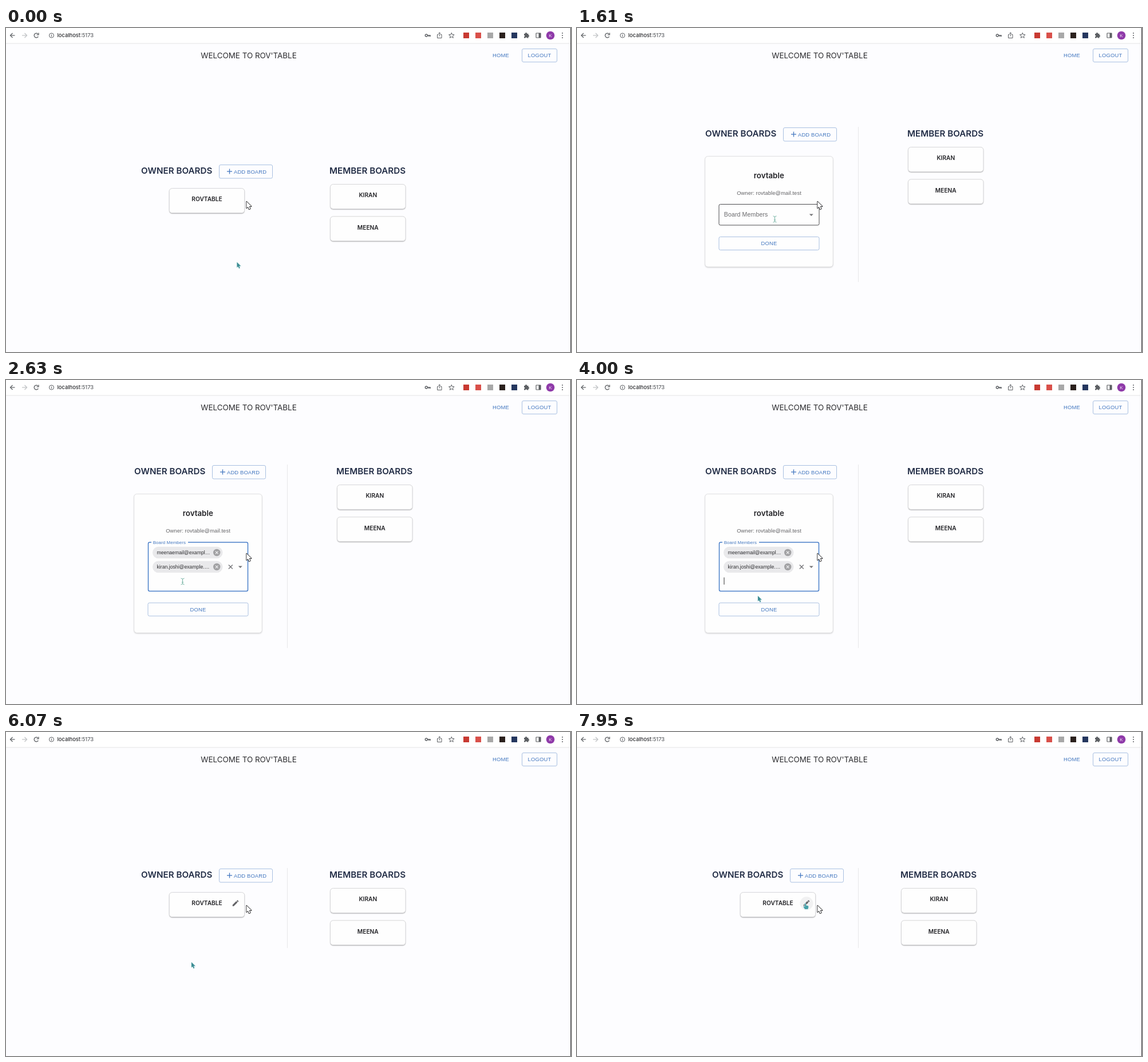
An HTML page with a canvas that plays this animation: 987 by 567 pixels, repeating every 8 s.

```html
<!DOCTYPE html>
<html lang="en">
<head>
<meta charset="utf-8">
<title>Boards</title>
<style>
  html, body { margin: 0; width: 100%; height: 100%; overflow: hidden; background: #fdfdff; }
  canvas { display: block; }
</style>
</head>
<body>
<canvas id="stage" width="987" height="567"></canvas>
<script>
const ctx = document.getElementById('stage').getContext('2d');
const LOOP = 8000;
const SANS = '"Liberation Sans", Arial, sans-serif';
const INTER = 'Inter, sans-serif';
const BLUE = '#4478c0', NAVY = '#232e47', INK = '#222226', ICON = '#5c5f63';
const STRONG = { family: INTER, weight: 600 };
const PENCIL = new Path2D('M3 17.25V21h3.75L17.81 9.94l-3.75-3.75zM20.71 7.04a1 1 0 0 0 0-1.41l-2.34-2.34a1 1 0 0 0-1.41 0l-1.83 1.83 3.75 3.75z');
const ARROW = new Path2D('M0 0V12.6L2.9 10L5 15L7.2 14L5.1 9.2H9.3Z');
const HAND = new Path2D('M-2.5 -4.5Q-1.3 -5.8 -.5 -4.3L.2 -1.2L4 -.2Q5.2 .5 4.6 3L3.6 6H-2L-4.6 2.2Q-5.2 .6 -3.4 .8L-1.8 1.8Z');

// Pointer samples, each held until the next: time, x, y, shape
const POINTER = [
  [0, 403.5, 410, 'arrow'], [120, 398, 382, 'arrow'], [270, 394, 355, 'arrow'],
  [550, 398, 336, 'arrow'], [680, 402, 316, 'hand'], [810, 401, 305, 'hand'],
  [1330, 399, 300, 'arrow'], [1610, 345.5, 334.5, 'beam'], [1890, 340, 338, 'beam'],
  [2020, 332, 343, 'beam'], [2150, 323, 347, 'beam'], [2280, 315, 350, 'beam'],
  [2410, 310, 352, 'beam'], [2630, 308.5, 352.5, 'beam'], [2900, 306.5, 352.5, 'beam'],
  [3860, 309, 360, 'beam'], [3990, 316, 378, 'arrow'], [4120, 323, 399, 'hand'],
  [4250, 326, 406, 'hand'], [5940, 324, 403, 'arrow'], [6350, 350, 393, 'arrow'],
  [6480, 440, 374, 'arrow'], [6610, 555, 354, 'arrow'], [6740, 585, 343, 'arrow'],
  [6870, 540, 329, 'arrow'], [7000, 465, 314, 'arrow'], [7130, 408, 306, 'hand'],
  [7300, 401, 303, 'hand'], [7450, 398, 304, 'hand'], [7700, 399, 305, 'hand'],
  [7950, 400, 304.5, 'hand']
];

// Draws text centred vertically on cy and returns its width
function text(str, x, cy, size, color, { align = 'left', family = SANS, weight = 400, gap = 0 } = {}) {
  ctx.font = `${weight} ${size}px ${family}`;
  ctx.letterSpacing = gap + 'px';
  ctx.textAlign = align;
  ctx.fillStyle = color;
  ctx.fillText(str, x, cy + size * 0.36);
  return ctx.measureText(str).width;
}

function rounded(x, y, w, h, r, stroke, fill, width = 1) {
  ctx.beginPath();
  ctx.roundRect(x, y, w, h, r);
  if (fill) { ctx.fillStyle = fill; ctx.fill(); }
  if (stroke) { ctx.strokeStyle = stroke; ctx.lineWidth = width; ctx.stroke(); }
}

function disc(x, y, r, fill, stroke, width = 1) {
  rounded(x - r, y - r, 2 * r, 2 * r, r, stroke, fill, width);
}

function line(color, width, ...points) {
  ctx.beginPath();
  points.forEach(([x, y]) => ctx.lineTo(x, y));
  ctx.strokeStyle = color;
  ctx.lineWidth = width;
  ctx.stroke();
}

function cross(x, y, r, color, width) {
  line(color, width, [x - r, y - r], [x + r, y + r]);
  line(color, width, [x + r, y - r], [x - r, y + r]);
}

function shape(path, x, y, scale, fill, stroke, width = 1) {
  ctx.save();
  ctx.translate(x, y);
  ctx.scale(scale, scale);
  ctx.lineJoin = 'round';
  ctx.lineWidth = width;
  if (stroke) { ctx.strokeStyle = stroke; ctx.stroke(path); }
  ctx.fillStyle = fill;
  ctx.fill(path);
  ctx.restore();
}

function card(x, y, w, h, border, shadow, blur) {
  ctx.save();
  ctx.shadowColor = `rgba(0,0,0,${shadow})`;
  ctx.shadowBlur = blur;
  ctx.shadowOffsetY = 1.2;
  rounded(x, y, w, h, 5, null, '#fefefe');
  ctx.restore();
  rounded(x, y, w, h, 5, border);
}

function button(label, x, y, w, h, hover) {
  rounded(x + .5, y + .5, w, h, 2.5, hover ? '#7fa6da' : '#a9c0e1', hover ? '#f4f8fd' : null);
  text(label, x + w / 2 + .5, y + h / 2 + .3, 9.4, BLUE, { align: 'center', gap: .2 });
}

function toolbar() {
  ctx.fillStyle = '#fff';
  ctx.fillRect(0, 0, 987, 27);
  ctx.fillStyle = '#e3e4e6';
  ctx.fillRect(0, 26.5, 987, 1);

  line(ICON, 1.2, [11.5, 9], [7.5, 13], [11.5, 17]);
  line(ICON, 1.2, [7.5, 13], [15.5, 13]);
  line('#bfc1c4', 1.2, [32.5, 9], [36.5, 13], [32.5, 17]);
  line('#bfc1c4', 1.2, [28, 13], [36.5, 13]);
  ctx.beginPath();
  ctx.arc(53, 13, 3.8, .5, 5.5);
  ctx.strokeStyle = ICON;
  ctx.lineWidth = 1.3;
  ctx.stroke();
  line(ICON, 1.3, [57, 8.5], [57, 11.8], [53.6, 11.8]);
  disc(79.5, 13, 4, null, ICON);
  line(ICON, 1, [79.5, 12.3], [79.5, 15.3]);
  line(ICON, 1, [79.5, 10.6], [79.5, 11.6]);
  const url = { family: INTER, weight: 500 };
  const host = text('localhost', 89.5, 13, 9.3, '#2b2c2f', url);
  text(':5173', 89.5 + host, 13, 9.3, '#5f6266', url);

  disc(734.3, 13, 2, null, ICON, 1.4);
  line(ICON, 1.6, [736.3, 13], [741, 13], [741, 15]);
  line(ICON, 1.6, [738.6, 13], [738.6, 15]);
  line(ICON, 1, [755.5, 11.5], [753.5, 11.5], [753.5, 17.5], [761, 17.5], [761, 11.5], [759, 11.5]);
  line(ICON, 1, [757.3, 14.5], [757.3, 8]);
  line(ICON, 1, [755.2, 10], [757.3, 8], [759.4, 10]);
  const star = Array.from({ length: 11 }, (_, i) => {
    const a = i * Math.PI / 5 - Math.PI / 2, r = i % 2 ? 2.2 : 5;
    return [778.3 + r * Math.cos(a), 13.3 + r * Math.sin(a)];
  });
  line(ICON, 1, ...star);

  ['#c83a32', '#d9504a', '#a8a8a8', '#2b211d', '#25375f'].forEach((color, i) => {
    ctx.fillStyle = color;
    ctx.fillRect(799 + 21 * i, 8, 10, 10);
  });
  ctx.fillStyle = ICON;
  ctx.fillRect(905, 10, 7.5, 7.5);
  disc(908.5, 9.6, 1.6, ICON);
  disc(912.5, 13.8, 1.6, ICON);
  disc(905.1, 14, 1.2, '#fff');
  disc(908.7, 17.4, 1.2, '#fff');
  rounded(926, 9, 8, 8, .5, ICON, null, 1.2);
  ctx.fillStyle = ICON;
  ctx.fillRect(930.5, 9, 3.5, 8);
  disc(951, 13, 7.3, '#8f3aa9');
  text('K', 951, 13, 8, '#f3e6f7', { align: 'center' });
  [9, 13, 17].forEach(y => disc(972, y, 1, ICON));
}

function header() {
  text("WELCOME TO ROV'TABLE", 424, 48, 13.4, '#2a2a2d', { align: 'center', family: INTER });
  text('HOME', 864.5, 48, 9.4, BLUE, { align: 'center', gap: .2 });
  button('LOGOUT', 901, 36, 61, 23);
}

function boardCard(name, x, y) {
  card(x, y, 131.5, 43, '#d6d6d8', .32, 1.5);
  text(name, x + 65.8, y + 19.1, 10.2, INK, { align: 'center', ...STRONG });
}

function columns(y, shift, dividerEnd) {
  text('OWNER BOARDS', 236 - shift, y, 15.2, NAVY, STRONG);
  const x = 372 - shift;
  rounded(x + .5, y - 10.5, 93, 23.5, 2.5, '#a9c0e1');
  line(BLUE, 1.3, [x + 14, y + 1], [x + 23, y + 1]);
  line(BLUE, 1.3, [x + 18.5, y - 3.5], [x + 18.5, y + 5.5]);
  text('ADD BOARD', x + 26, y + 1.2, 9.4, BLUE, { gap: .15 });

  text('MEMBER BOARDS', 565 + shift, y, 15.2, NAVY, STRONG);
  ['KIRAN', 'MEENA'].forEach((name, i) => boardCard(name, 566.5 + shift, y + 23.5 + i * 56.3));
  if (dividerEnd) line('#e7e7e9', 1, [491.5, y - 12], [491.5, dividerEnd]);
}

function boardList(t, px, py) {
  columns(250, 0, t > 5000 ? 378 : 0);
  boardCard('ROVTABLE', 285.2, 280.7);
  if (t < 680) return;
  const over = Math.hypot(px - 401, py - 300) < 12;
  if (t >= 1070 && t < 1330) disc(401.2, 299.6, 11.7, '#e4e9f2', '#4270b8', 1.8);
  else if (over) disc(401, 299.8, 11.5, '#f1f1f2');
  shape(PENCIL, 394, 292.5, .585, '#636366');
}

function chip(label, y) {
  rounded(256, y - 10.3, 122.5, 20.6, 10.3, null, '#e9e9eb');
  text(label, 263.5, y + .2, 8.7, '#2e2e31');
  disc(368.2, y, 6.2, '#a2a2a4');
  cross(368.2, y, 2.3, '#f0f0f1', 1.2);
}

function editor(t, py) {
  const open = t >= 1760;
  const y = open ? 160 : 185;
  const top = y + 123.5, height = open ? 86 : 36.5;
  const doneTop = top + height + 20;
  columns(y, 12, doneTop + 79.5);
  card(223.7, y + 39.5, 223.5, doneTop + 53 - y - 39.5, '#e0e0e2', .2, 2.5);
  text('rovtable', 335.3, y + 73.6, 13.3, INK, { align: 'center', ...STRONG });
  text('Owner: rovtable@mail.test', 335.5, y + 104, 9.35, '#626265', { align: 'center', gap: .1 });

  if (open) {
    rounded(248.5, top + .5, 174, height - .5, 2.5, '#4a7fc9', null, 1.5);
    ctx.fillStyle = '#fefefe';
    ctx.fillRect(254, top - 2, 64, 5);
    text('Board Members', 256.7, top + .2, 7.95, BLUE, { gap: .07 });
    chip('meenaemail@exampl…', 302);
    chip('kiran.joshi@example.…', 327);
    cross(392.3, 327, 3.5, '#707073', 1.2);
    const caretOn = t < 2250 || (t >= 2750 && t < 3300) || (t >= 3730 && t < 4320) || (t >= 4860 && t < 5260);
    if (caretOn) {
      ctx.fillStyle = '#333';
      ctx.fillRect(256.5, 345.5, 1, 12.5);
    }
  } else {
    rounded(248, top, 175, height, 2.5, t >= 1610 ? '#4c4c4f' : '#c4c4c6');
    text('Board Members', 256.8, 326.6, 10.6, '#69696c', { gap: .1 });
  }
  ctx.beginPath();
  ctx.moveTo(405.8, 325.5);
  ctx.lineTo(412.8, 325.5);
  ctx.lineTo(409.3, 329);
  ctx.fillStyle = '#737376';
  ctx.fill();
  button('DONE', 247.5, doneTop, 175, 23, py > doneTop && t > 4000);
}

function pointer(x, y, kind) {
  if (kind === 'arrow') shape(ARROW, x, y, .72, '#3c8d94', '#d6ebed', 1.6);
  if (kind === 'hand') shape(HAND, x, y, .9, '#45a0a8', '#d8edf0', 1.4);
  if (kind === 'beam') {
    const color = '#79b5a6';
    line(color, 1.1, [x, y - 4.5], [x, y + 4.5]);
    [-1, 1].forEach(s => line(color, 1, [x - 3, y + s * 5.5], [x, y + s * 4.3], [x + 3, y + s * 5.5]));
    line(color, 1, [x - 1.7, y + 1.5], [x + 1.7, y + 1.5]);
  }
}

function draw(t) {
  const [, x, y, kind] = POINTER.findLast(sample => sample[0] <= t);
  ctx.fillStyle = '#fdfdff';
  ctx.fillRect(0, 0, 987, 567);
  toolbar();
  header();
  if (t >= 1330 && t < 5800) editor(t, y);
  else boardList(t, x, y);
  pointer(x, y, kind);
  shape(ARROW, 420.2, 303.8, .9, '#fff', '#2a2a2c', 2);
  ctx.fillStyle = '#3c3c40';
  ctx.fillRect(986, 0, 1, 567);
}

const start = performance.now();
function tick() {
  draw((performance.now() - start) % LOOP);
  requestAnimationFrame(tick);
}
tick();
</script>
</body>
</html>
```
